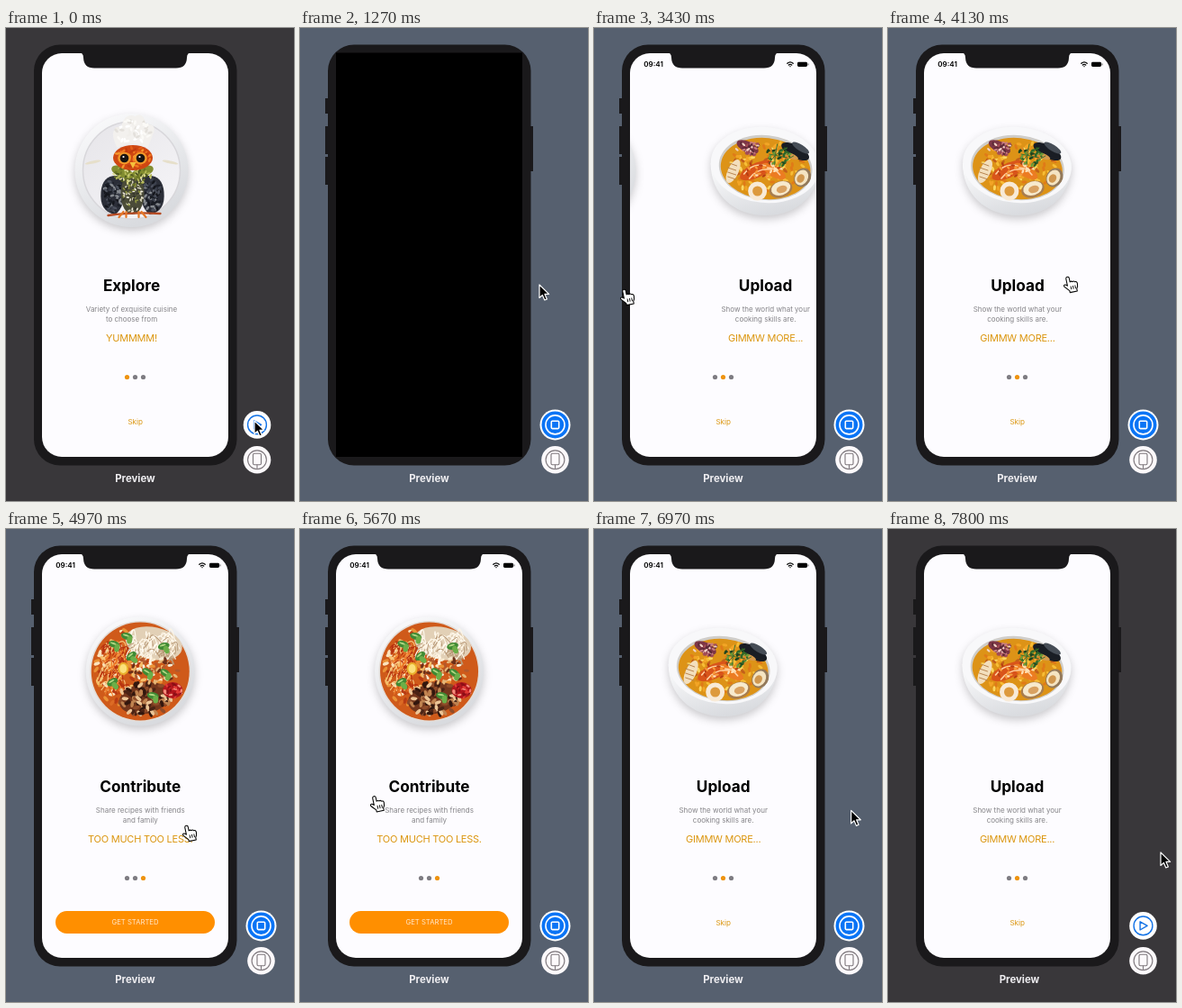
An HTML page for the animation above (7830 ms loop, 320 by 525 pixels).

```html
<!DOCTYPE html>
<html lang="en">
<head>
<meta charset="utf-8">
<style>
  html, body { margin: 0; width: 100%; height: 100%; overflow: hidden; background: #39373a; }
  svg { display: block; width: 320px; height: 525px; font-family: Inter, sans-serif; }
  text { text-anchor: middle; }
  .title { font-size: 17.2px; font-weight: 700; }
  .body { font-size: 8px; fill: #858488; }
  .tag { font-size: 11px; letter-spacing: -.25px; fill: #db960f; }
  .food { filter: drop-shadow(0 4px 5px #0003); }
  .line { fill: none; stroke-linecap: round; stroke-linejoin: round; }
</style>
</head>
<body>
<svg viewBox="0 0 320 525">
  <defs>
    <clipPath id="screen"><rect x="40" y="28" width="207" height="448" rx="22"/></clipPath>
    <linearGradient id="china" x2=".5" y2="1"><stop stop-color="#fdfdfe"/><stop offset="1" stop-color="#d9dbdf"/></linearGradient>
    <linearGradient id="well" x2=".8" y2="1"><stop stop-color="#e6e5e9"/><stop offset="1" stop-color="#f5f4f7"/></linearGradient>
  </defs>
  <rect id="backdrop" width="320" height="525"/>

  <g fill="#1a191b">
    <path id="keys" d="M28 78h4v17h-4zM28 109h4v31h-4zM28 143h4v31h-4zM255 109h4v50h-4z"/>
    <rect x="31" y="18.5" width="225.5" height="467" rx="29"/>
  </g>

  <g id="app">
    <g clip-path="url(#screen)">
      <rect x="40" y="27" width="207" height="450" fill="#fdfcff"/>
      <g id="pages"></g>
      <g id="dots"></g>
      <text id="skip" x="143.7" y="439.5" font-size="8.1" fill="#db960f">Skip</text>
      <g id="start">
        <rect x="55" y="424" width="177" height="25" rx="12.5" fill="#ff8f00"/>
        <text x="143.5" y="439.3" font-size="7.7" fill="#ffe9cf">GET STARTED</text>
      </g>
    </g>
    <path fill="#1a191b" d="M81 27q5 .5 5 6 .5 11.5 12 11.5h91q11.5 0 12-11.5 0-5.500 5-6z"/>
    <g id="status">
      <text x="66" y="43.4" font-size="8.1" font-weight="600">09:41</text>
      <g class="line" stroke="#000" stroke-width="1.3">
        <path d="M214.8 39.3q3.2-2.8 6.4 0M216.3 41q1.7-1.4 3.4 0"/>
        <path d="M218 42.6v.1"/>
      </g>
      <rect x="226" y="37.8" width="11" height="5.2" rx="1.4"/>
      <path d="M238 39.4v2" stroke="#555"/>
    </g>
  </g>
  <rect id="black" x="40" y="27.5" width="207" height="448.5"/>

  <text id="caption" y="504" font-size="11.4" font-weight="700" fill="#eeedf0">Preview</text>

  <g id="controls">
    <g id="play" transform="translate(0 440.4)">
      <circle r="15.3" fill="#fff"/>
      <g class="line" stroke="#1473e6" stroke-width="1.4">
        <circle r="10.4"/><path d="M-3.4-4.600v9.2l8-4.6z"/>
      </g>
    </g>
    <g id="stop" transform="translate(0 440.4)">
      <circle r="17" fill="#fff"/><circle r="15" fill="#0a74f5"/>
      <g class="line" stroke="#fff" stroke-width="1.6">
        <circle r="10.5"/><rect x="-4.2" y="-4.2" width="8.4" height="8.4" rx="1"/>
      </g>
    </g>
    <circle cy="479.3" r="15.3" fill="#fcf9fb"/>
    <g class="line" stroke="#7d777c" stroke-width="1.1">
      <circle cy="479.3" r="10.4"/>
      <rect x="-4.5" y="472.3" width="9" height="12.5" rx="1.5" fill="#fcf9fb"/>
      <path d="M0 485v4"/>
    </g>
  </g>

  <g id="cursor" stroke-linejoin="round">
    <path id="arrow" d="M0 0V14.5L3.4 11.4 5.8 17 8.4 15.9 6 10.4H10.6Z" stroke="#fff" stroke-width="1.2"/>
    <g id="hand" transform="translate(-2.5 .5) rotate(-12) scale(1.05)" stroke="#000" fill="#fff">
      <path d="M-2 1.5Q-2-.2-.3-.2T1.4 1.5V5.5Q3 4.5 4 5.8 5.6 5 6.5 6.5 8.6 6.2 8.8 8.3L8.3 11.8 7 14V16.5H-.8V14.5Q-3.2 12-5.5 9.2-6 7.4-4.5 7.3-3.2 7.5-2 9Z"/>
      <path d="M1.3 10v3.6M3.6 10v3.6M5.9 10v3.6" stroke-width=".9"/>
    </g>
  </g>
</svg>

<script>
const LOOP = 7830, PAGE = 207, MID = 143.5;
const $ = id => document.getElementById(id);

let seed = 7;
const random = () => (seed = seed * 16807 % 2147483647) / 2147483647;

const oval = (x, y, rx, ry, fill, turn = 0) =>
  `<ellipse rx="${rx}" ry="${ry}" fill="${fill}" transform="translate(${x} ${y}) rotate(${turn})"/>`;
const stroke = (d, color, width) => `<path class="line" d="${d}" stroke="${color}" stroke-width="${width}"/>`;
const shape = (d, fill) => `<path d="${d}" fill="${fill}"/>`;

// Small morsels strewn over an elliptical area
function scatter(n, x, y, rx, ry, size, colors) {
  let out = '';
  for (let i = 0; i < n; i++) {
    const a = random() * 6.283, r = Math.sqrt(random());
    out += oval((x + rx * r * Math.cos(a)).toFixed(1), (y + ry * r * Math.sin(a)).toFixed(1),
      size, size * .5, colors[i % colors.length], Math.round(random() * 180));
  }
  return out;
}

function strands(n, x, y, rx, ry, color, width = 1.1) {
  let d = '';
  for (let i = 0; i < n; i++) {
    const px = x + (random() * 2 - 1) * rx, py = y + (random() * 2 - 1) * ry;
    d += `M${px.toFixed(1)} ${py.toFixed(1)}q${(random() * 12).toFixed(1)} -9 ${(random() * 20 - 6).toFixed(1)} 6`;
  }
  return stroke(d, color, width);
}

const leaf = (x, y, turn) =>
  oval(x, y, 6.5, 3.8, '#3f8a34', turn) + oval(x + 3, y + 4, 4.5, 3, '#6cae48', turn + 80) +
  oval(x - 1, y - 1, 3.5, 1, '#b0d681', turn);

const mirror = draw => draw(-1) + draw(1);

const owl = () =>
  `<circle r="63" fill="url(#china)"/><circle r="54" fill="url(#well)" stroke="#d8d7db" stroke-width="1.5"/>` +
  mirror(s => oval(s * 43, -9, 9, 1.6, '#e6dfca', s * 12)) +
  mirror(s => shape(`M${1 + s * 11} 7Q${1 + s * 33} 2 ${1 + s * 35} 24T${1 + s * 19} 49Q${1 + s * 8} 40 ${1 + s * 9} 20Z`, '#2b2e38') +
    scatter(60, 1 + s * 22, 28, 10, 18, 2.6, ['#3c414d', '#1b1e26', '#4d525e', '#15171d', '#868a90'])) +
  oval(1, 26, 13, 23, '#4a4b38') +
  scatter(75, 1, 29, 11, 18, 1.8, ['#f0ecdc', '#8e9440', '#33342b', '#d3cfb4', '#55563c']) +
  mirror(s => oval(1 + s * 11, 2, 13, 6, '#828d30', s * -22)) +
  scatter(80, 1, 5, 21, 11, 2, ['#b5b956', '#6a7427', '#dad88f', '#4c5620']) +
  oval(1.5, -14, 22, 14, '#cf4712') +
  scatter(45, 1.5, -14, 20, 12, 2.6, ['#f17a20', '#c23c0e', '#f6982d', '#e35f18']) +
  mirror(s => oval(1 + s * 9, -13.5, 7.3, 6.8, '#f3992a') + oval(1 + s * 9, -13.5, 4.8, 4.8, '#191411') +
    oval(s * 9, -15, 1.1, 1.1, '#fff')) +
  shape('M-2-9H5L1.5-2Z', '#f5c03b') +
  shape('M-16-25Q-27-48-12-46-8-65 4-60 13-66 16-51 30-52 23-38L18-25Q0-34-16-25Z', '#f3f1ee') +
  scatter(50, 2, -43, 19, 14, 2.8, ['#fff', '#e3e0db', '#fbfaf7', '#f0eeea']) +
  stroke('M-26 50Q0 46 32 48', '#b64b24', 2.4) + stroke('M-9 46l-5 6M-6 46v6M8 46v6M11 46l5 6', '#e47728', 2.2);

const chowder = () =>
  shape('M-61-8C-61 26-36 50 0 50S60 26 60-8Z', 'url(#china)') +
  oval(-.5, -6, 60.5, 42, '#f8f8fa', 5) + oval(0, -3, 52, 36, '#cfcdc9', 6) + oval(0, -2, 50, 34, '#dd9317', 6) +
  scatter(110, 0, -2, 46, 30, 3, ['#f7bd36', '#e07a18', '#fbd660', '#c2601a', '#f3a526']) +
  oval(-36, 1, 6, 14, '#f3dfbd', 25) + stroke('M-40-8l8 3M-42-3l9 3M-42 2l9 3M-42 7l9 3', '#b98550', 1) +
  oval(-20, -26, 13, 6, '#7d3646', 25) +
  scatter(30, -19, -24, 14, 8, 2.3, ['#c77c81', '#5a2836', '#f3d3c6', '#a04b56']) +
  oval(-10, 0, 20, 8, '#d9541a', -25) + oval(9, 1, 15, 6, '#ec7c22', 30) +
  stroke('M-24 4q10-13 24-9M-18 9q9-12 24-10M2-3q8 0 14 8', '#ffd0a0', 1.6) +
  scatter(24, -3, -1, 22, 9, 2.4, ['#b83f14', '#f79b3c', '#ffe0b4']) +
  oval(33, -21, 17, 7, '#191d24', 28) + oval(39, -25, 11, 3.5, '#464d56', 32) + oval(28, -16, 9, 3, '#d6994b', 22) +
  oval(17, 21, 13, 9, '#a87d4e', -18) + oval(17, 20, 11, 7.5, '#f7eacd', -18) + oval(18, 21, 6, 4, '#d9a262', -18) +
  oval(41, 8, 9, 11, '#93795a', 30) + oval(40, 8, 7, 9, '#f4e4c2', 30) + oval(39, 9, 4, 5, '#d0974f', 30) +
  `<circle cx="-9" cy="23" r="8" fill="#dd9a3e" stroke="#f8ead7" stroke-width="5"/>` +
  scatter(36, 13, -15, 15, 11, 2.6, ['#2f6428', '#6d9c38', '#1f4520', '#e08a24']) +
  stroke('M4-8q8-13 20-17M10-6q0-12 3-23M17-8l14-8M4-18l20 4', '#3f7330', 1);

const ramen = () =>
  `<circle r="60.5" fill="url(#china)"/><circle r="56" fill="#e3ddd8"/><circle r="54.5" fill="#cf5a1a"/>` +
  scatter(150, -12, 0, 38, 46, 3.6, ['#ea9236', '#b83c14', '#f6bd68', '#dc6b25', '#fbe3bd']) +
  oval(15, -31, 32, 18, '#e2d0b6', 12) +
  strands(34, 10, -30, 24, 13, '#fffaf0') + strands(24, 10, -26, 26, 14, '#b99a78') + strands(24, 10, -28, 26, 16, '#fff6e6') +
  strands(36, -34, -6, 10, 24, '#f8c880') + strands(32, -32, -4, 12, 24, '#b8300f') + strands(16, -32, 0, 10, 22, '#ee7a28') +
  oval(5, 30, 29, 17, '#74371d', -12) +
  scatter(80, 5, 30, 31, 18, 3.8, ['#4a2315', '#c08350', '#8f4c2a', '#ecc596', '#32170e']) +
  oval(36, 21, 11, 9, '#b3161d') + scatter(26, 36, 21, 10, 8, 2.3, ['#e23b36', '#8c0f17', '#f58d7c']) +
  scatter(50, 14, -1, 28, 14, 3, ['#f8ead0', '#b3592c', '#e5b676', '#6d3019']) +
  oval(-19, -3, 6, 7, '#e9b02c') + oval(-19, -3, 4, 5, '#fbe07a') +
  leaf(-29, -30, 20) + leaf(26, -28, -15) + leaf(28, 2, 35) + leaf(-10, -17, -40) +
  leaf(8, 1, 30) + leaf(14, 27, 10) + leaf(-31, 12, -30) + leaf(-15, -39, 15);

const pages = [
  [owl, 'Explore', 'Variety of exquisite cuisine', 'to choose from', 'YUMMMM!'],
  [chowder, 'Upload', 'Show the world what your', 'cooking skills are.', 'GIMMW MORE...'],
  [ramen, 'Contribute', 'Share recipes with friends', 'and family', 'TOO MUCH TOO LESS.'],
];
$('pages').innerHTML = pages.map(([draw, title, line1, line2, tag], i) => `
  <g transform="translate(${MID + i * PAGE})">
    <g class="food" transform="translate(0 158)">${draw()}</g>
    <text class="title" y="292">${title}</text>
    <text class="body" y="314.5">${line1}</text><text class="body" y="325.5">${line2}</text>
    <text class="tag" y="348">${tag}</text>
  </g>`).join('');
$('dots').innerHTML = [-9, 0, 9].map(x => `<circle cx="${MID + x}" cy="387.5" r="2.6"/>`).join('');

// Pointer path: time, x, y
const path = [
  [0, 276, 436], [250, 276, 436], [1270, 266, 285], [1630, 258, 290], [1780, 120, 291], [2600, 114, 291],
  [2870, 65, 283], [3280, 36, 290], [3530, 36, 290], [4130, 202, 276], [4230, 202, 276], [4600, 80, 285],
  [4680, 6, 290], [4970, 203, 329], [5150, 203, 329], [5850, 62, 290], [5950, 62, 290], [6270, 284, 235],
  [6700, 288, 250], [7400, 281, 437], [7560, 281, 437], [7800, 303, 359], [LOOP, 303, 359],
];
// Swipes: press time, release time, page before, page after
const swipes = [[2600, 3280, 0, 1], [4230, 4560, 1, 2], [5950, 6300, 2, 1]];

const clamp = v => Math.min(1, Math.max(0, v));
const smooth = v => v * v * (3 - 2 * v);

function pointer(t) {
  const i = path.findIndex(p => p[0] > t), a = path[i - 1], b = path[i];
  const k = smooth((t - a[0]) / (b[0] - a[0]));
  return [a[1] + (b[1] - a[1]) * k, a[2] + (b[2] - a[2]) * k];
}

// The page follows the pointer while held, then decays to its rest position
function scrollAt(t) {
  if (t < 1450) return 4;
  const swipe = swipes.filter(s => t >= s[0]).pop();
  if (!swipe) return 0;
  const [press, release, from, to] = swipe;
  const dragged = from * PAGE + pointer(press)[0] - pointer(Math.min(t, release))[0];
  const rest = to * PAGE;
  return t < release ? dragged : rest + (dragged - rest) * Math.exp((release - t) / 150);
}

const show = (id, on) => $(id).style.display = on ? '' : 'none';
const move = (id, x, y = 0) => $(id).setAttribute('transform', `translate(${x.toFixed(2)} ${y.toFixed(2)})`);

function render(t) {
  const live = smooth(clamp((t - 30) / 250)) * (1 - smooth(clamp((t - 7570) / 150)));
  const mix = (a, b) => Math.round(a + (b - a) * live);
  $('backdrop').setAttribute('fill', `rgb(${mix(57, 86)},${mix(55, 96)},${mix(58, 111)})`);

  const running = t >= 1450 && t < 7570, launching = t >= 600 && t < 1450;
  show('keys', t >= 60);
  show('app', !launching);
  show('black', launching);
  show('status', running);
  show('stop', t >= 100 && t < 7570);
  show('play', t < 100 || t >= 7570);
  move('controls', t < 60 ? 279 : 283.5);
  $('caption').setAttribute('x', t < 7570 ? MID : 146);

  const scroll = scrollAt(t), page = Math.round(scroll / PAGE);
  move('pages', -scroll);
  [...$('dots').children].forEach((dot, i) => dot.setAttribute('fill', i === page ? '#ee930f' : '#7e7c82'));
  show('skip', page < 2);
  show('start', page === 2);

  const [x, y] = pointer(t), overApp = running && x > 31 && x < 257;
  move('cursor', x, y);
  show('hand', overApp);
  show('arrow', !overApp);
}

const begin = performance.now();
(function tick() {
  render((performance.now() - begin) % LOOP);
  requestAnimationFrame(tick);
})();
</script>
</body>
</html>
```
